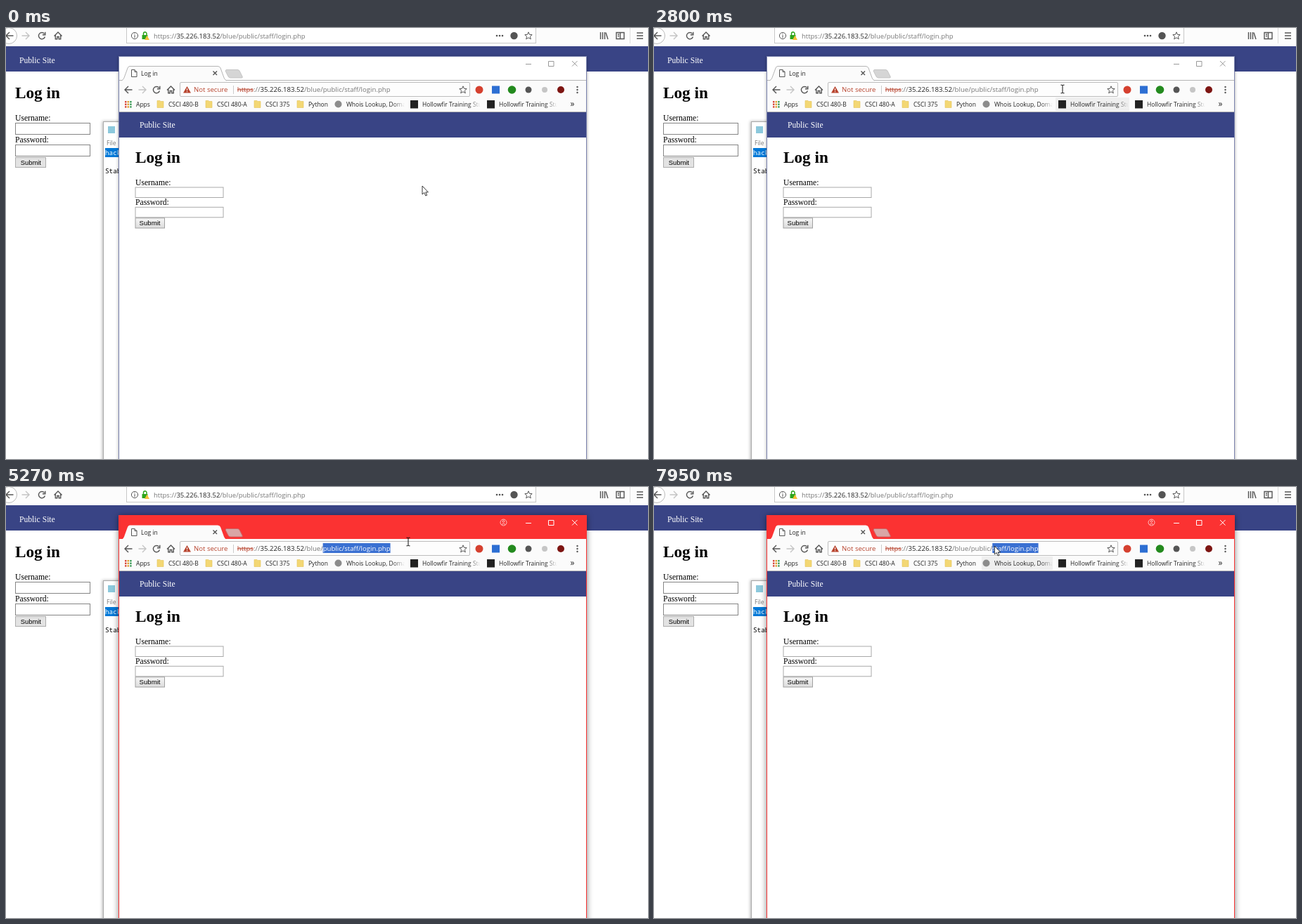
Animation of 913x614 px, one loop 8000 ms. Source, as an HTML page:

```html
<!DOCTYPE html>
<html lang="en">
<head>
<meta charset="utf-8">
<title>Login page</title>
<style>
html, body { margin: 0; width: 100%; height: 100%; overflow: hidden; background: #fff; }
svg { display: block; }
text { white-space: pre; }
.ui { font: 8.5px "Open Sans", "Noto Sans", sans-serif; fill: #222; }
.url { font: 9.6px "Open Sans", "Noto Sans", sans-serif; fill: #777; }
.serif { font: 11.65px "Liberation Serif", serif; }
.head { font: bold 23.2px "Liberation Serif", serif; }
.btn { font: 9.6px "Liberation Sans", sans-serif; }
.mono { font: 9.3px "Noto Sans Mono", "DejaVu Sans Mono", monospace; }
.white { fill: #fff; }
.host { fill: #222; }
.bad { fill: #b8452f; }
.strike { text-decoration: line-through; }
.line { fill: none; stroke: #555; stroke-width: 1.4; }
.dim { stroke: #c4c4c4; }
.thin { stroke-width: 1; }
.selected tspan { fill: #fff; }
#frame { fill: #fff; stroke: #7a82ae; filter: drop-shadow(0 1px 2px rgba(0,0,0,.35)); }
#caption { fill: #fff; }
#newTab { fill: #d5d5d5; stroke: #c4c4c4; }
#controls { stroke: #999; fill: none; }
#profile { visibility: hidden; fill: none; stroke: #ffc4c4; }
#tab { fill: #fbfbfb; stroke: #b5b5b5; }
.active #frame { stroke: #fb3232; filter: drop-shadow(0 1px 4px rgba(0,0,0,.5)); }
.active #caption { fill: #fb3232; }
.active #newTab { fill: #d9a6a6; stroke: #c66; }
.active #controls { stroke: #fff; }
.active #profile { visibility: visible; }
.active #tab { stroke: none; }
.active #tabLine { display: none; }
</style>
</head>
<body>
<svg width="913" height="614" viewBox="0 0 913 614">
  <defs>
    <linearGradient id="fade" gradientUnits="userSpaceOnUse" x1="66" x2="83" y1="0" y2="0">
      <stop stop-color="#222"/><stop offset="1" stop-color="#222" stop-opacity="0"/>
    </linearGradient>
    <linearGradient id="button" x2="0" y2="1">
      <stop stop-color="#f6f6f6"/><stop offset="1" stop-color="#dcdcdc"/>
    </linearGradient>
    <clipPath id="selClip"><rect id="selClipRect" y="78" height="20"/></clipPath>
    <path id="left" d="M5.5 0H-4.5M0-5L-5 0L0 5"/>
    <path id="right" d="M-5.5 0H4.5M0-5L5 0L0 5"/>
    <path id="reload" d="M3.6-2.8A4.6 4.6 0 1 0 4.4 1.5M4.8-5.2V-1.3H.9"/>
    <path id="home" d="M-5.5.5L0-5L5.5.5M-3.7-.8V4.8H-1.2V1.5H1.2V4.8H3.7V-.8"/>
    <path id="star" d="M0-5.2L1.5-1.7L5.2-1.4L2.4 1.1L3.3 4.8L0 2.8L-3.3 4.8L-2.4 1.1L-5.2-1.4L-1.5-1.7Z"/>
    <path id="folder" d="M0 0H4L5 1H9V10H0Z" fill="#f3d774" stroke="#e5c35a" stroke-width=".6"/>
  </defs>

  <!-- browser behind -->
  <rect width="913" height="26" fill="#fcfcfc"/>
  <circle cx="4" cy="11" r="11.5" fill="#fff" stroke="#bbb"/>
  <g class="line">
    <use href="#left" x="5" y="11"/>
    <use href="#right" x="28" y="11" class="dim"/>
    <use href="#reload" x="51" y="11"/>
    <use href="#home" x="74" y="11"/>
  </g>
  <rect x="171.5" y="-2" width="582" height="23.5" fill="#fff" stroke="#c8c8c8"/>
  <g class="line thin">
    <circle cx="183" cy="11" r="4.6"/>
    <path d="M183 10V14M183 8V9"/>
    <use href="#star" x="743" y="11"/>
    <path d="M887.5 0V22" stroke="#ddd"/>
  </g>
  <path d="M195.5 10V8A2.2 2.2 0 0 1 200 8V10" fill="none" stroke="#2ca51c" stroke-width="1.5"/>
  <rect x="193.5" y="10" width="8" height="6" fill="#2ca51c"/>
  <path d="M200.5 10.5L204 17H197Z" fill="#f3c13a"/>
  <text class="url" x="210" y="15" style="font-size:9.5px">https://<tspan class="host">35.226.183.52</tspan>/blue/public/staff/login.php</text>
  <g fill="#555">
    <circle cx="698" cy="11" r="1.3"/><circle cx="702" cy="11" r="1.3"/><circle cx="706" cy="11" r="1.3"/>
    <circle cx="722.5" cy="11" r="5.2"/>
  </g>
  <g class="line">
    <path d="M845.5 6V16M848.5 6V16M851.5 6V16M853 6.5L856 16"/>
    <path d="M868 6.5H879V15.5H868ZM873.5 6.5V15.5M870 9H872M870 11.5H872"/>
    <path d="M897 7H906M897 11H906M897 15H906"/>
  </g>
  <rect y="26" width="913" height="36" fill="#394485"/>
  <g class="serif">
    <text class="white" x="19" y="50">Public Site</text>
    <text class="head" x="13" y="99.5">Log in</text>
    <text x="13" y="132">Username:</text>
    <text x="13" y="163">Password:</text>
  </g>
  <g fill="#fff" stroke="#858585">
    <rect x="13.5" y="135.5" width="106" height="16"/>
    <rect x="13.5" y="166.5" width="106" height="16"/>
    <rect x="13.5" y="184.5" width="43" height="14" fill="#e3e3e3" stroke="#adadad"/>
  </g>
  <text class="btn" x="20.8" y="195.3" style="font-size:9.4px">Submit</text>

  <!-- text editor -->
  <rect x="138.5" y="133.5" width="60" height="500" fill="#fff" stroke="#aaa" style="filter:drop-shadow(-1px 0 2px rgba(0,0,0,.3))"/>
  <rect x="145" y="140" width="10" height="10" fill="#8cc8dc"/>
  <text class="ui" x="143" y="167" style="fill:#777">File</text>
  <rect x="141" y="171" width="30" height="13" fill="#0078d7"/>
  <g class="mono">
    <text class="white" x="141" y="181">hack</text>
    <text x="141" y="207">Stab</text>
  </g>

  <!-- front browser -->
  <g id="win">
    <rect id="frame" x="160.5" y="40.5" width="665" height="590"/>
    <rect id="caption" x="161" y="41" width="664" height="33"/>
    <rect x="161" y="74" width="664" height="46" fill="#fbfbfb"/>
    <path id="tabLine" d="M161 74.5H825" stroke="#b5b5b5"/>
    <path id="tab" d="M164 75C167 74 168 71 169 68L173 57Q174 54.5 176 54.5H301Q304 54.5 305 57L309 68C310 71 311 74 314 75"/>
    <path id="newTab" d="M313 59.5H329Q331 59.5 332 61L336 69Q337 71 335 71H319Q317 71 316 69L312 61Z"/>
    <g id="controls">
      <path d="M739 51.5H747M771.5 47.5H779V54.5H771.5ZM805 47L812.5 54.5M812.5 47L805 54.5"/>
    </g>
    <g id="profile">
      <circle cx="707.5" cy="50.5" r="4.5"/><circle cx="707.5" cy="49" r="1.4"/><path d="M704.5 53.5Q707.5 50.8 710.5 53.5"/>
    </g>
    <path class="line thin" d="M178.5 59.5H183L186 62.5V69.5H178.5ZM183 59.5V62.5H186"/>
    <text class="ui" x="192" y="67.5">Log in</text>
    <path class="line" d="M294.5 61.5L300 67M300 61.5L294.5 67"/>

    <g class="line">
      <use href="#left" x="174" y="88"/>
      <use href="#right" x="194" y="88" class="dim"/>
      <use href="#reload" x="214" y="88"/>
      <use href="#home" x="234.5" y="88"/>
    </g>
    <rect x="247.5" y="77.5" width="412" height="20" rx="1.5" fill="#fdfdfd" stroke="#bdbdbd"/>
    <path d="M257.5 83L263 92.5H252Z" fill="#b8452f"/>
    <path d="M257.5 86V89M257.5 90V91.3" stroke="#fff"/>
    <text class="url bad" x="267" y="91.3">Not secure</text>
    <path d="M323.5 82V94" stroke="#ccc"/>
    <text id="url" class="url" x="328.8" y="91.3"><tspan class="bad strike">https</tspan><tspan>://</tspan><tspan class="host">35.226.183.52</tspan><tspan>/blue/public/staff/login.php</tspan></text>
    <rect id="sel" y="80" height="14" fill="#3a70d2"/>
    <g id="selText" class="selected" clip-path="url(#selClip)"></g>
    <use href="#star" x="650" y="88" class="line thin"/>
    <circle cx="673" cy="88" r="5.5" fill="#d5402f"/>
    <rect x="691" y="82.5" width="11" height="11" fill="#2d6fd3"/>
    <circle cx="719.5" cy="88" r="5.8" fill="#238a1e"/>
    <circle cx="743" cy="88" r="4.5" fill="#555"/>
    <circle cx="766" cy="88" r="4" fill="#c6c6c6"/>
    <circle cx="789" cy="88" r="5" fill="#7d1512"/>
    <g fill="#555"><circle cx="812.5" cy="84" r="1.2"/><circle cx="812.5" cy="88" r="1.2"/><circle cx="812.5" cy="92" r="1.2"/></g>

    <rect id="hoverA" x="466" y="99" width="101" height="19" rx="1" fill="#efefef"/>
    <rect id="hoverB" x="571" y="99" width="105" height="19" rx="1" fill="#efefef"/>
    <g id="apps"></g>
    <use href="#folder" x="215" y="103.5"/><use href="#folder" x="284" y="103.5"/>
    <use href="#folder" x="353" y="103.5"/><use href="#folder" x="414" y="103.5"/>
    <circle cx="472.5" cy="108.5" r="5" fill="#8c8c8c"/>
    <rect x="575" y="103" width="11" height="11.5" fill="#222"/>
    <rect x="684" y="103" width="11" height="11.5" fill="#222"/>
    <g class="ui">
      <text x="185" y="111.5">Apps</text>
      <text x="231" y="111.5">CSCI 480-B</text>
      <text x="300" y="111.5">CSCI 480-A</text>
      <text x="369" y="111.5">CSCI 375</text>
      <text x="430" y="111.5">Python</text>
      <g fill="url(#fade)">
        <text transform="translate(484 111.5)">Whois Lookup, Doma</text>
        <text transform="translate(592 111.5)">Hollowfir Training Stu</text>
        <text transform="translate(701 111.5)">Hollowfir Training Stu</text>
      </g>
      <text x="802.5" y="112" style="font-size:12px">»</text>
    </g>
    <path d="M161 119.5H825" stroke="#b8b8b8"/>

    <rect x="161" y="120" width="664" height="36" fill="#394485"/>
    <rect x="161" y="156" width="664" height="458" fill="#fff"/>
    <g class="serif">
      <text class="white" x="190" y="142">Public Site</text>
      <text class="head" x="184" y="192.3">Log in</text>
      <text x="184" y="224">Username:</text>
      <text x="184" y="252">Password:</text>
    </g>
    <g fill="#fff" stroke="#a9a9a9">
      <rect x="184" y="227" width="125" height="14.5"/>
      <rect x="184" y="255.3" width="125" height="14.5"/>
      <rect x="184" y="270.8" width="41.5" height="14.2" fill="url(#button)" stroke="#a0a0a0"/>
    </g>
    <text class="btn" x="189.6" y="281.2">Submit</text>
  </g>

  <g id="pointer">
    <path id="arrow" d="M0 0V12L2.8 9.5L4.8 14L6.7 13.2L4.8 8.9H8.4Z" fill="#fff" stroke="#222" stroke-width=".9"/>
    <path id="beam" d="M-2.5-5.8H-.8L0-5L.8-5.8H2.5M0-5V5M-2.5 5.8H-.8L0 5L.8 5.8H2.5" fill="none" stroke="#111"/>
  </g>
</svg>
<script>
const $ = id => document.getElementById(id);
const LOOP = 8000, STEP = 45;
const ACTIVATE = 2940, RELEASE = 3400, REGRAB = 5550;

// pointer path: time, x, y
const path = [
  [0, 592, 225], [1500, 592, 225], [1700, 470, 140], [1980, 352, 205],
  [2130, 168, 262], [2270, 253, 346], [2330, 262, 356], [2520, 430, 290],
  [2800, 581, 87], [2940, 581, 87], [3400, 452.5, 91], [3700, 452.5, 91],
  [4090, 594, 99], [5269, 594, 99], [5270, 572, 78], [5310, 572, 78],
  [5400, 562, 105], [5550, 557, 88], [6020, 526, 87], [6320, 475.8, 87],
  [6649, 475.8, 87], [6750, 477.2, 87], [7009, 477.2, 87], [7070, 480, 87],
  [7349, 480, 87], [7380, 483, 87], [7649, 483, 87], [7800, 483, 85],
  [7949, 483, 85], [7950, 484.3, 84], [8000, 484.3, 84]
];

// Position moves in discrete ticks, always landing on the path's own times.
function pointerAt(time) {
  const i = path.findLastIndex(p => p[0] <= time);
  const a = path[i], b = path[i + 1] || a;
  const tick = Math.max(a[0], Math.floor(time / STEP) * STEP);
  const k = b === a ? 0 : (tick - a[0]) / (b[0] - a[0]);
  return [a[1] + (b[1] - a[1]) * k, a[2] + (b[2] - a[2]) * k];
}

const url = $("url");
const chars = Array.from({ length: url.getNumberOfChars() }, (_, i) =>
  [url.getStartPositionOfChar(i).x, url.getEndPositionOfChar(i).x]);
const urlEnd = chars.at(-1)[1];
const copy = url.cloneNode(true);
copy.removeAttribute("id");
$("selText").append(copy);

const appColors = ["#d9483b", "#e0a030", "#3b9a55", "#3f78cf"];
$("apps").innerHTML = Array.from({ length: 9 }, (_, i) =>
  `<rect x="${169 + i % 3 * 3.6}" y="${104 + Math.floor(i / 3) * 3.6}" width="2.4" height="2.4" fill="${appColors[(i + Math.floor(i / 3)) % 4]}"/>`).join("");

function selectionStart(time) {
  if (time < ACTIVATE) return urlEnd;
  const x = pointerAt(time < REGRAB ? Math.min(time, RELEASE) : time)[0] - 1;
  const hit = chars.find(([from, to]) => x < (from + to) / 2);
  return hit ? hit[0] : urlEnd;
}

const show = (id, on) => $(id).setAttribute("visibility", on ? "visible" : "hidden");

function draw(now) {
  const time = now % LOOP;
  const [x, y] = pointerAt(time);
  const beam = time >= 2760 && time < 7800 && !(time >= 5355 && time < 5500);
  $("pointer").setAttribute("transform", `translate(${x} ${y})`);
  show("beam", beam);
  show("arrow", !beam);
  show("hoverA", time >= 5400);
  show("hoverB", time >= 2745 && time < ACTIVATE);
  $("win").classList.toggle("active", time >= ACTIVATE);

  const start = selectionStart(time);
  for (const id of ["sel", "selClipRect"]) {
    $(id).setAttribute("x", start);
    $(id).setAttribute("width", urlEnd - start);
  }
  requestAnimationFrame(tick);
}

const begin = performance.now();
function tick() { draw(performance.now() - begin); }
tick();
</script>
</body>
</html>
```
